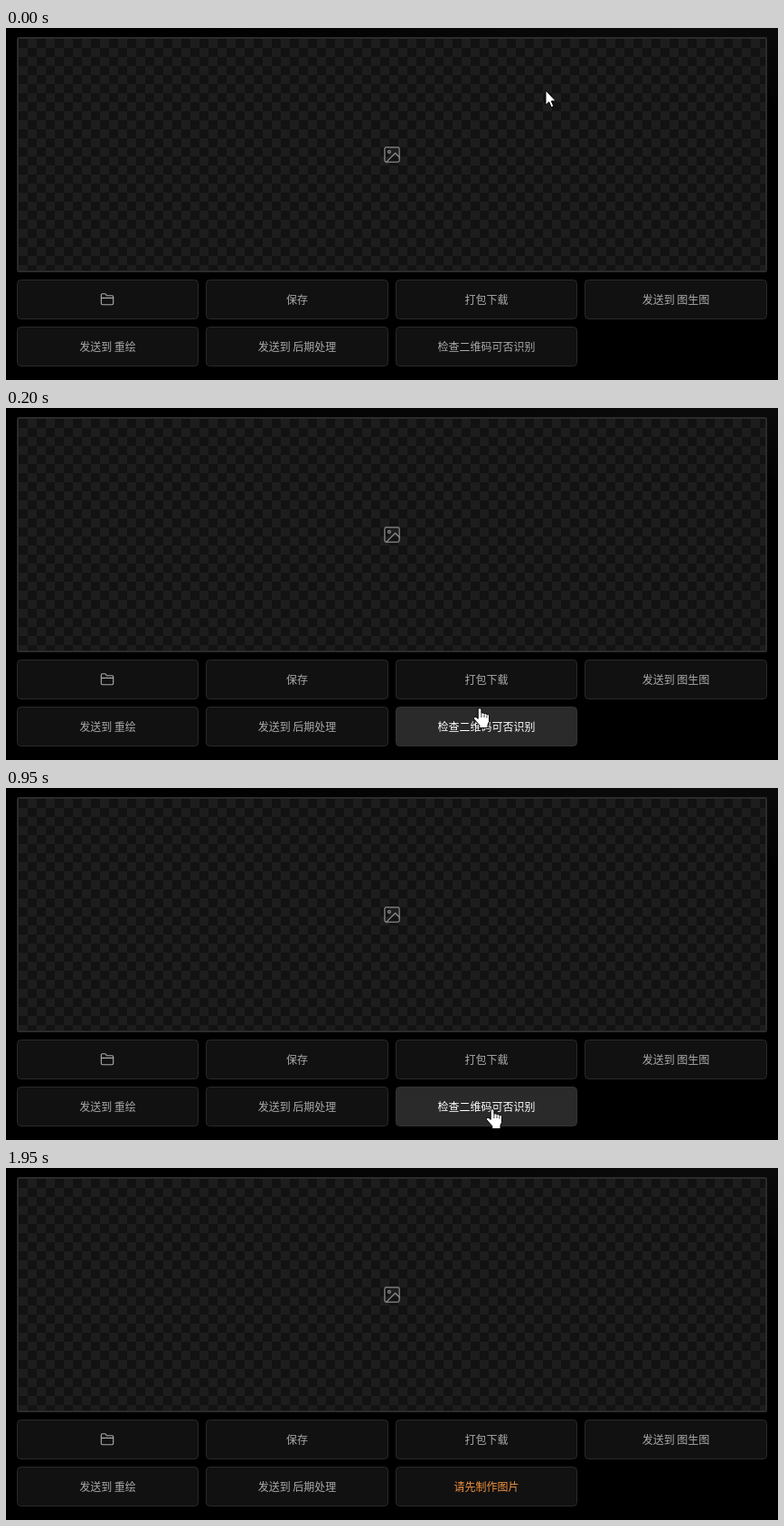
Recreate the animation shown at these times as an HTML page. Size 854x389 px, loop 2.95 s.

```html
<!DOCTYPE html>
<html lang="zh-CN">
<head>
<meta charset="utf-8">
<style>
  html, body { margin: 0; width: 100%; height: 100%; overflow: hidden; background: #000; }
  svg { display: block; width: 854px; height: 389px; }
  text { font: 12px "Noto Sans CJK SC", "Noto Sans CJK", sans-serif; text-anchor: middle; fill: #aaa; }
  .btn rect { fill: #111; stroke: #2a2a2a; }
  .btn.hover rect { fill: #2a2a2a; stroke: #333; }
  .btn.hover text { fill: #fff; }
  .btn.warn text { fill: #f0913e; }
  .icon { fill: none; stroke-linecap: round; stroke-linejoin: round; }
  .pointer { fill: #fff; stroke: #000; stroke-linejoin: round; }
</style>
</head>
<body>
<svg viewBox="0 0 854 389">
  <defs>
    <radialGradient id="glow" gradientUnits="userSpaceOnUse" cx="760" cy="0" r="600"
      gradientTransform="matrix(1 0 0 .16 0 0)">
      <stop offset="0" stop-color="#0b0b0b"/>
      <stop offset="1" stop-color="#000"/>
    </radialGradient>
    <pattern id="checker" x="14" y="12" width="20" height="20" patternUnits="userSpaceOnUse">
      <rect width="20" height="20" fill="#121212"/>
      <path d="M10 0h10v10h-10zM0 10h10v10h-10z" fill="#1d1d1d"/>
    </pattern>
  </defs>
  <rect width="854" height="389" fill="url(#glow)"/>
  <rect x="13" y="11" width="828" height="258" rx="1" fill="url(#checker)" stroke="#2b2b2b" stroke-width="2"/>
  <g class="icon" stroke="#8c8c8c" stroke-width="1.4" transform="translate(427 140) scale(.9) translate(-12 -12)">
    <rect x="3" y="3" width="18" height="18" rx="2"/>
    <circle cx="8.5" cy="8.5" r="1.6"/>
    <path d="M21 15l-5-5L5 21"/>
  </g>
  <g id="buttons"></g>
  <path class="icon" stroke="#aaa" stroke-width="1.7" transform="translate(112 299.7) scale(.667) translate(-12 -12)"
    d="M22 19a2 2 0 0 1-2 2H4a2 2 0 0 1-2-2V5a2 2 0 0 1 2-2h5l2 3h9a2 2 0 0 1 2 2zM2 10h20"/>
  <g id="arrow" class="pointer">
    <path d="M0 0V16.2L3.7 12.8L6.2 18.6L8.8 17.5L6.3 11.8H11.3Z"/>
  </g>
  <g id="hand" class="pointer">
    <path d="M-1.8 2.2a1.9 1.9 0 0 1 3.7 0V6.6a1.7 1.7 0 0 1 3.1 .7a1.6 1.6 0 0 1 2.9 .9a1.5 1.5 0 0 1 2.6 1.2V15.5L9 19V22.6H-.2V19.6L-6.3 12.8a1.7 1.7 0 0 1 2.3-2.3L-1.8 12.4Z"/>
    <path d="M1.9 7V11M5 8V11M7.9 9V11.5" fill="none" stroke-width=".8"/>
  </g>
</svg>
<script>
const LOOP = 2950;
const columns = [[12, 213], [221, 423], [431, 632], [640, 842]];
const labels = ["", "保存", "打包下载", "发送到 图生图", "发送到 重绘", "发送到 后期处理", "检查二维码可否识别"];
const CHECK = 6, PACK = 2;

// Sampled pointer positions: time, x, y
const track = [
  [0, 597, 69], [50, 586, 116], [100, 547, 233], [150, 521, 315], [200, 524, 331],
  [250, 528, 336], [350, 530, 341], [400, 533, 347], [450, 535, 351], [500, 537, 353],
  [950, 538, 354], [1800, 537, 353], [1850, 534, 363], [1900, 531, 380], [1950, -50, -50]
];

const byId = id => document.getElementById(id);

function make(tag, attrs, parent) {
  const el = document.createElementNS("http://www.w3.org/2000/svg", tag);
  for (const key in attrs) el.setAttribute(key, attrs[key]);
  return parent.appendChild(el);
}

const buttons = labels.map((label, i) => {
  const [left, right] = columns[i % 4];
  const top = i < 4 ? 278 : 330;
  const group = make("g", { class: "btn" }, byId("buttons"));
  make("rect", { x: left + .5, y: top + .5, width: right - left - 1, height: 43, rx: 4 }, group);
  const text = make("text", { x: (left + right) / 2, y: top + 26.6 }, group);
  text.textContent = label;
  return { left, right, top, group, text };
});

function place(id, shown, x, y) {
  const el = byId(id);
  el.setAttribute("visibility", shown ? "visible" : "hidden");
  el.setAttribute("transform", `translate(${x} ${y})`);
}

function draw(t) {
  const [, x, y] = track.findLast(step => step[0] <= t);
  const over = buttons.findIndex(b => x >= b.left && x < b.right && y >= b.top && y < b.top + 44);
  const warn = t >= 1100;
  buttons.forEach((b, i) => {
    b.group.classList.toggle("hover", i === over);
    b.group.classList.toggle("warn", warn && i === CHECK);
  });
  buttons[CHECK].text.textContent = warn ? "请先制作图片" : labels[CHECK];
  place("arrow", over < 0, x, y);
  place("hand", over >= 0, x, y);
}

const start = performance.now();
function tick() {
  draw((performance.now() - start) % LOOP);
  requestAnimationFrame(tick);
}
draw(0);
requestAnimationFrame(tick);
</script>
</body>
</html>
```
